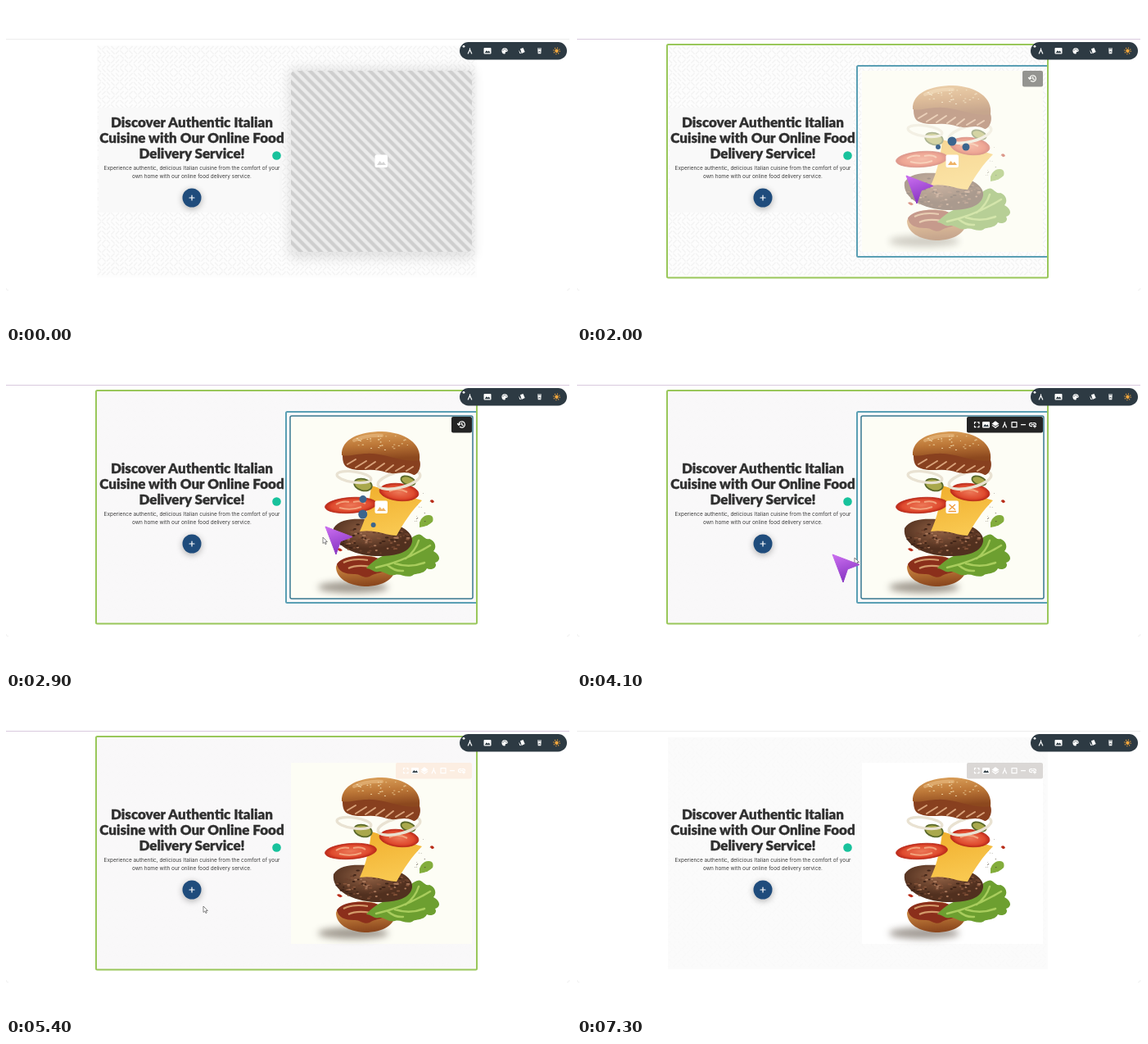
Animation, 690 px wide and 388 px high, one loop 7.9 s. Source, as an HTML page:

```html
<!DOCTYPE html>
<html lang="en">
<head>
<meta charset="utf-8">
<title>Page builder</title>
<style>
html, body { margin: 0; height: 100%; overflow: hidden; background: #fff; }
svg { display: block; width: 100vw; height: 100vh; }
.title { font: 900 17px Lato, sans-serif; fill: #2f2f2f; stroke: #2f2f2f; stroke-width: .3; stroke-linejoin: round; }
.copy { font: 6.45px Inter, sans-serif; fill: #3c3c3c; }
.line { fill: none; stroke: #fff; stroke-width: 1.2; stroke-linecap: round; stroke-linejoin: round; }
</style>
</head>
<body>
<svg viewBox="0 0 690 388">
<defs>
  <pattern id="stripes" width="12.2" height="12.2" patternUnits="userSpaceOnUse" x="348" y="300">
    <rect width="13" height="13" fill="#ebebeb"/>
    <path d="M-6.1 -6.1L18.3 18.3M-6.1 6.1L6.1 18.3M6.1 -6.1L18.3 6.1" stroke="#cecece" stroke-width="4.3"/>
  </pattern>
  <linearGradient id="violet" x1=".3" y1="0" x2=".6" y2="1"><stop stop-color="#c66bec"/><stop offset="1" stop-color="#8330c0"/></linearGradient>
  <linearGradient id="crust" x1="0" y1="0" x2=".15" y2="1"><stop stop-color="#dca25c"/><stop offset=".5" stop-color="#bd7838"/><stop offset="1" stop-color="#8c481e"/></linearGradient>
  <linearGradient id="cheese" x1="0" y1="0" x2=".3" y2="1"><stop stop-color="#f0ae2c"/><stop offset="1" stop-color="#f9c850"/></linearGradient>
  <radialGradient id="tomato"><stop stop-color="#ec7958"/><stop offset=".75" stop-color="#df4a2e"/><stop offset="1" stop-color="#bc2819"/></radialGradient>
  <radialGradient id="meat" cx=".45" cy=".3"><stop stop-color="#946346"/><stop offset="1" stop-color="#51301f"/></radialGradient>
  <filter id="soft" x="-30%" y="-60%" width="160%" height="220%"><feGaussianBlur stdDeviation="4"/></filter>
  <filter id="glow" x="-20%" y="-20%" width="140%" height="140%"><feGaussianBlur stdDeviation="7"/></filter>
  <g id="picture"><rect x="-4.5" y="-3.8" width="9" height="7.6" rx="1"/><path d="M-3.4 2.4L-1.2-.6L.4 1L1.8-.4L3.5 2.4Z" fill="#2c3a42"/></g>
  <path id="compass" class="line" d="M0-3V-1.5M-2.2 3.2L0-1.5L2.2 3.2"/>
</defs>

<path id="rule" d="M0 40.5H688" stroke="#ececec"/>
<path d="M0 344q0 3 3 3M688 344q0 3-3 3" fill="none" stroke="#f0f0f0"/>
<rect id="panel" x="111" y="48" width="464" height="283"/>
<path id="texture" fill="none" stroke="#f3f3f3" stroke-width="1.4" stroke-linecap="round"/>
<rect id="copyBox" x="113" y="124" width="224" height="128" fill="#f9f9f9"/>
<g class="title" text-anchor="middle">
  <text x="227" y="147.7">Discover Authentic Italian</text>
  <text x="227" y="167">Cuisine with Our Online Food</text>
  <text x="227" y="186.3">Delivery Service!</text>
</g>
<g class="copy" text-anchor="middle">
  <text x="227" y="200.4">Experience authentic, delicious Italian cuisine from the comfort of your</text>
  <text x="227" y="210">own home with our online food delivery service.</text>
</g>
<circle cx="330.5" cy="182.5" r="5.3" fill="#18c29c"/>
<circle cx="227" cy="236" r="11.5" fill="#000" opacity=".3" filter="url(#soft)"/>
<circle cx="227" cy="234" r="11.5" fill="#1f4c7c"/>
<path d="M224 234h6M227 231v6" class="line"/>

<g id="placeholder">
  <rect x="345" y="76" width="227" height="232" rx="8" opacity=".1" filter="url(#glow)"/>
  <rect x="348" y="79" width="221" height="221" rx="5" fill="url(#stripes)"/>
</g>
<rect id="photo" x="348" y="79" width="221" height="221"/>
<g id="burger">
  <ellipse cx="424" cy="287" rx="43" ry="7" fill="#54483c" opacity=".55" filter="url(#soft)"/>
  <path d="M403 262C406 250 432 246 450 250L476 264C474 276 462 286 438 286C418 285 403 276 403 262Z" fill="url(#crust)"/>
  <path d="M404 259C412 245 452 246 468 258C468 270 453 268 444 274C437 277 432 270 425 271C414 271 406 268 404 259Z" fill="#8b2f1b"/>
  <path d="M412 257q12-6 30-3M418 264q10-5 27-2" fill="none" stroke="#d39a6a" stroke-width="2.2"/>
  <path d="M440 264C450 252 462 247 478 242C488 236 494 225 502 223C508 220 511 230 517 228C525 231 526 239 522 243C531 248 531 255 524 257C528 263 519 267 514 264C510 272 500 269 496 273C488 276 482 270 475 272C466 274 463 267 456 268C449 270 447 264 440 264Z" fill="#6d9f30"/>
  <path d="M452 263Q485 256 518 236M475 258Q493 264 511 257M488 252Q500 243 504 230M466 260Q475 268 485 267" fill="none" stroke="#a9cd5d" stroke-width="2.5" stroke-linecap="round"/>
  <path d="M505 208Q509 198 517 199Q523 200 521 207Q515 213 505 214Z" fill="#83ad3c"/>
  <path d="M400 215C408 202 430 203 450 205C478 207 498 219 496 231C494 245 474 250 451 249C424 248 397 235 400 215Z" fill="url(#meat)"/>
  <g id="crumbs"></g>
  <path d="M446 163L508 181C495 194 486 208 477 224C463 224 452 216 432 219C440 202 444 184 446 163Z" fill="url(#cheese)"/>
  <g fill="url(#tomato)" stroke="#b82a1a" stroke-width=".8">
    <ellipse cx="480" cy="171" rx="24" ry="10.5" transform="rotate(6 480 171)"/>
    <ellipse cx="421" cy="187" rx="31.5" ry="9.5" transform="rotate(-4 421 187)"/>
  </g>
  <path d="M403 186q8-5 16-3M424 183q10-2 15 2M407 190q14 4 27-1M468 170q11-5 22 1" fill="none" stroke="#f3a27c" stroke-width="2"/>
  <g fill="#a9a84c" stroke="#59682a" stroke-width="1.8">
    <ellipse cx="436" cy="162" rx="11" ry="7" transform="rotate(15 436 162)"/>
    <ellipse cx="491" cy="157" rx="9" ry="5" transform="rotate(20 491 157)"/>
  </g>
  <g fill="none" stroke="#e9e2d2" stroke-width="3.4">
    <ellipse cx="425" cy="152.500" rx="21" ry="6.500" transform="rotate(8 425 152.500)"/>
    <ellipse cx="480" cy="156" rx="26.500" ry="9.500" transform="rotate(-14 480 156)"/>
  </g>
  <path d="M411 126C430 120 485 124 505 132C508 140 503 150 498 150C485 143 477 151 465 147C447 140 432 147 420 142C412 140 411 133 411 126Z" fill="#88401f"/>
  <path d="M417 137l10-6M427 141l13-8M439 142l12-8M452 143l10-7M464 145l9-7M476 145l10-6M489 145l8-5" stroke="#d9a37b" stroke-width="2" stroke-linecap="round"/>
  <path d="M410 126C409 106 432 97 459 97C488 98 508 112 505 132C484 136 460 122 441 124C428 124 418 128 410 126Z" fill="url(#crust)"/>
  <path d="M425 108Q440 101 459 102" fill="none" stroke="#f0c58d" stroke-width="4" opacity=".5" stroke-linecap="round"/>
  <g id="seeds"></g>
  <path d="M404 240q4-2 7 2q-4 3-7-2M405 244l2 2M518 181q4-2 5 2q-4 3-5-2" fill="#b92c18"/>
</g>
<g id="badge">
  <rect x="450.500" y="181.500" width="15.500" height="15.500" rx="2" fill="#fff"/>
  <path id="badgeMark" d="M453 194L456.500 189L459 192L461 190L464 194Z"/>
  <path id="badgeCross" d="M454.500 186L462 192.500M462 186L454.500 192.500M453.500 194.500H463" fill="none" stroke="#ee9a3c" stroke-width="1.3"/>
</g>
<g id="spinner" fill="#3c658e"><circle r="5.500"/><circle r="4.500"/><circle r="3"/></g>

<g fill="none">
  <rect id="inner" x="347" y="78" width="223" height="223" rx="2" stroke="#39788f" stroke-width="1.500"/>
  <rect id="blue" x="342" y="73" width="233" height="233" rx="1.500" stroke="#5a9fb4" stroke-width="2"/>
  <rect id="green" x="110" y="47" width="465" height="284.500" rx="1.500" stroke="#99c75a" stroke-width="2"/>
</g>

<g id="reset">
  <rect x="544" y="79" width="25" height="19.500" rx="2" fill="#242424"/>
  <path class="line" d="M553 88.500a3.700 3.700 0 1 1 1.300 2.800M551.500 87.500l1.500 1.800l1.800-1.600M556.700 86.500v2.300l1.500.8"/>
</g>
<g id="tools">
  <rect id="toolsBar" x="476" y="79" width="93" height="19.500" rx="2"/>
  <g transform="translate(0 88.700)" fill="#fff">
    <path class="line" d="M485.500-1.300V-3H487M489.500-3H491V-1.300M491 1.300V3H489.500M487 3H485.500V1.300"/>
    <use href="#picture" x="499.500"/>
    <path d="M511-4.500L515.500-1.300L511 1.800L506.500-1.300ZM506.500 1L511 4.200L515.500 1L514.500.2L511 2.700L507.500.2Z"/>
    <use href="#compass" x="522.300"/>
    <path class="line" d="M531-3h6v6h-6ZM542.500 0h5M556-2h-1.500a2 2 0 0 0 0 4h1M557.500-2h1a2 2 0 0 1 2 2M555 0h3M557.500 2h3M559 .6v2.800"/>
  </g>
</g>

<rect x="554" y="44" width="131" height="21.500" rx="10.700" fill="#2d3a43"/>
<g transform="translate(0 54.800)" fill="#fff">
  <circle cx="559" cy="-5.500" r="1.400"/>
  <use href="#compass" x="566.500"/>
  <use href="#picture" x="588"/>
  <path d="M609-3.600a3.600 3.600 0 1 0 0 7.200q1.200-.2.700-1.400q0-1 1-1q2.200 0 2.100-1.700q-.4-3-3.800-3.100Z"/>
  <path d="M607-1h.1M609-2h.1M611-1h.1" class="line" style="stroke:#2d3a43"/>
  <path d="M628-2.500l3.500-1.200l2.200 5l-4 1.800ZM626.200-1l1 4l2 .5Z"/>
  <path d="M649-3.300h5v1h-5ZM649.300-1.700h4.400l-.4 5.200h-3.600Z"/>
  <path d="M650.500 0l2 2m0-2l-2 2" stroke="#2d3a43" stroke-width=".7"/>
  <circle cx="672.500" r="2.200" fill="#f2a63c"/>
  <circle cx="672.500" r="3.700" fill="none" stroke="#f2a63c" stroke-width="1.300" stroke-dasharray="1 1.906"/>
</g>

<g id="drag">
  <rect width="41" height="41" fill="#fdfdfd" stroke="#8a8a8a" stroke-width=".8"/>
  <path d="M0 41.200H41.200V0" fill="none" stroke="#555"/>
  <rect x="25" y="41" width="30" height="10" fill="#fff" stroke="#ddd" stroke-width=".5"/>
  <text x="27" y="48.500" style="font:6px Inter,sans-serif" fill="#555">→ Move</text>
</g>
<path id="pointer" d="M0 0V7.500L1.800 6L3 8.600L4.300 8L3.100 5.500H5.400Z" fill="#fff" stroke="#555" stroke-width=".7"/>
<path id="cursor" d="M0 0L33 12.500L18.500 18L13 34Z" fill="url(#violet)" stroke="url(#violet)" stroke-linejoin="round"/>
</svg>
<script>
const LOOP = 7900, STEP = 100;
const $ = id => document.getElementById(id);
const set = (id, attrs) => { for (const k in attrs) $(id).setAttribute(k, attrs[k]); };
const fade = (id, value) => set(id, { opacity: value });
const place = (id, [x, y]) => set(id, { transform: `translate(${x} ${y})` });

let seed = 7;
const random = () => (seed = seed * 16807 % 2147483647) / 2147483647;

// Linear interpolation through keys of the form [time, ...values].
function track(t, ...keys) {
  const i = keys.findIndex(k => k[0] > t);
  if (i === 0) return keys[0].slice(1);
  if (i < 0) return keys.at(-1).slice(1);
  const a = keys[i - 1], b = keys[i], p = (t - a[0]) / (b[0] - a[0]);
  return a.slice(1).map((v, j) => v + (b[j + 1] - v) * p);
}

function buildTexture() {
  let d = '';
  for (let y = 51; y < 329; y += 5.5)
    for (let x = 114; x < 572; x += 5.5)
      d += random() < .5 ? `M${x - 1.7} ${y - 1.7}l3.4 3.4` : `M${x - 1.7} ${y + 1.7}l3.4-3.4`;
  set('texture', { d });
}

// Scatters small ellipses inside an oval.
function scatter(id, count, [cx, cy, rx, ry], size, colors) {
  let html = '';
  for (let i = 0; i < count; i++) {
    const a = random() * 2 * Math.PI, r = Math.sqrt(random());
    html += `<ellipse cx="${cx + rx * r * Math.cos(a)}" cy="${cy + ry * r * Math.sin(a)}" rx="${size * (.6 + random())}" ry="${size * .6}" fill="${colors[i % colors.length]}"/>`;
  }
  $(id).innerHTML += html;
}

buildTexture();
scatter('crumbs', 120, [448, 227, 44, 19], 1.7, ['#3f2418', '#a9775a', '#6b412c', '#835238']);
scatter('crumbs', 16, [508, 192, 16, 22], .6, ['#4d4231']);
scatter('seeds', 32, [459, 110, 34, 10], 1, ['#f3dcae', '#e6c48d']);

function draw(t) {
  const dropped = t >= 2000, selected = dropped && t < 5300, ended = t >= 5900;
  const [shown] = track(t, [2000, .48], [2700, 1]);
  const [outline] = track(t, [5500, 1], [5900, 0]);

  set('rule', { stroke: dropped && !ended ? '#d9c9de' : '#ececec' });
  set('panel', { fill: t < 2300 ? '#fdfdfd' : ended ? '#fbfbfb' : '#f9f8f9' });
  fade('texture', track(t, [2000, 1], [2700, .12], [5900, .12], [6200, .3])[0]);
  fade('copyBox', t < 2700 ? 1 : .3);
  fade('placeholder', dropped ? 0 : 1);
  set('photo', { fill: ended ? '#fff' : '#fdfdf5', opacity: dropped ? 1 : 0 });
  fade('burger', dropped ? shown : 0);

  fade('badge', t < 5200 ? 1 : 0);
  set('badgeMark', { fill: dropped ? '#efb264' : '#d5d5d5', opacity: t < 3600 ? 1 : 0 });
  fade('badgeCross', t < 3600 ? 0 : 1);
  fade('spinner', dropped && t < 3500 ? 1 : 0);
  const turn = -90 - (t - 2000) / 900 * 112;
  [...$('spinner').children].forEach((dot, i) => {
    const a = (turn + [0, 45, -45][i]) * Math.PI / 180;
    dot.setAttribute('cx', 458 + 24 * Math.cos(a));
    dot.setAttribute('cy', 189 + 24 * Math.sin(a));
  });

  fade('green', dropped ? outline : 0);
  fade('blue', selected ? 1 : 0);
  fade('inner', selected ? track(t, [2000, 0], [2700, 1])[0] : 0);
  fade('reset', dropped && t < 3600 ? shown : 0);
  fade('tools', t >= 3600 ? 1 : 0);
  set('toolsBar', t < 5300 ? { fill: '#242424' } : { fill: ended ? '#dad7d5' : '#fceee2' });

  const grip = track(t, [300, -49, 220], [1000, 315, 182], [1100, 367, 180]);
  const moving = t >= 300;
  place('drag', grip);
  fade('drag', moving && !dropped ? 1 : 0);
  place('cursor', dropped
    ? track(t, [2000, 402, 207], [2900, 390, 213], [3500, 360, 230], [4100, 312, 247], [4400, 270, 255], [5100, 17, 266], [5300, -50, 268])
    : [grip[0] + 35, grip[1] + 27]);
  fade('cursor', moving && t < 5300 ? 1 : 0);
  place('pointer', dropped
    ? track(t, [2800, 391, 224], [4100, 339, 251], [5200, 241, 254])
    : [grip[0] + 21, grip[1] + 37]);
  fade('pointer', moving && !dropped || t >= 2800 && !ended ? 1 : 0);
}

function frame() {
  draw(Math.floor(performance.now() % LOOP / STEP) * STEP);
  requestAnimationFrame(frame);
}
frame();
</script>
</body>
</html>
```
